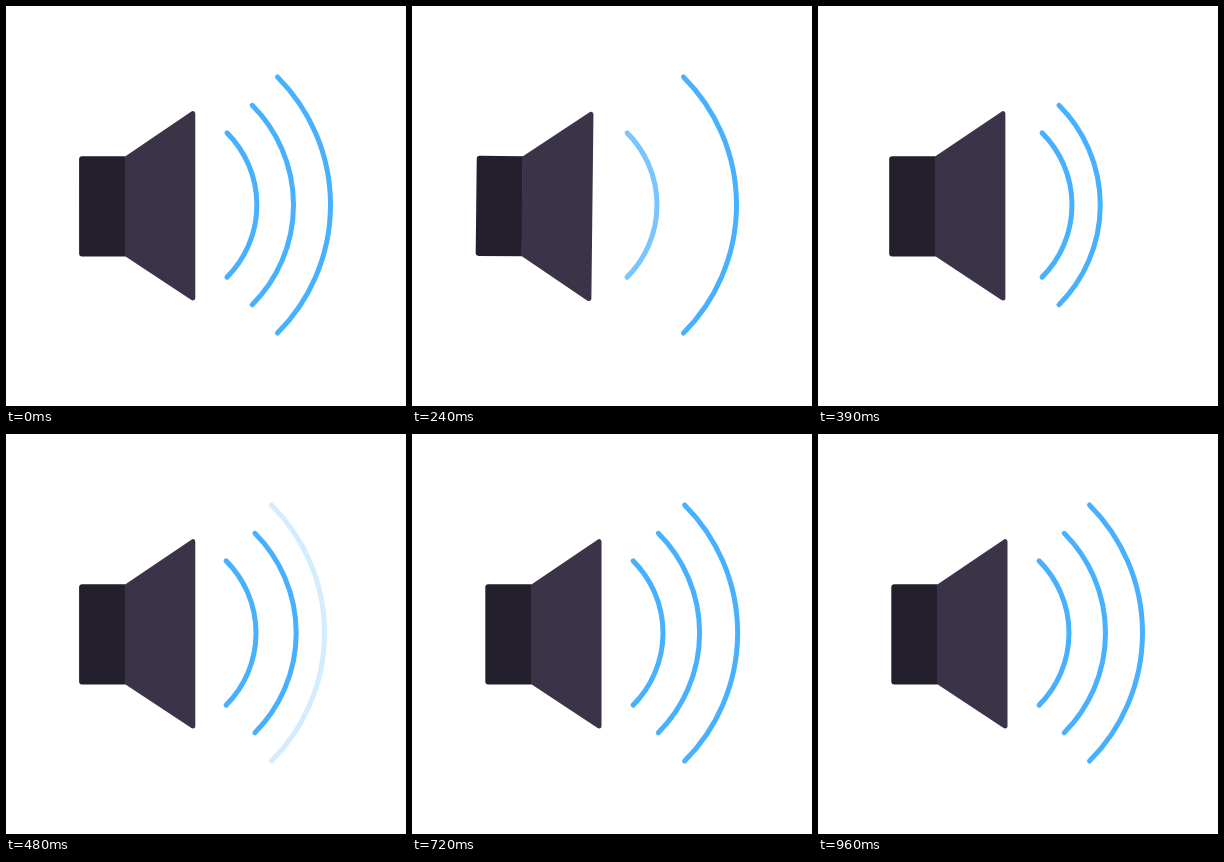
An HTML page with a canvas for the animation above (1.99 s loop, 400 by 400 pixels).

```html
<!DOCTYPE html>
<html lang="en">
<head>
<meta charset="utf-8">
<title>Speaker</title>
<style>
html, body { margin: 0; width: 100%; height: 100%; overflow: hidden; background: #fff; }
canvas { display: block; width: 400px; height: 400px; }
</style>
</head>
<body>
<canvas id="stage" width="400" height="400"></canvas>
<script>
const ctx = document.getElementById('stage').getContext('2d');
const LOOP = 1990, END = 960;

// back: pull-back begins, out: faded out, spring: release
const waves = [
  { apex: 251, r: 102, back: 0, out: 150, spring: 255 },
  { apex: 287.5, r: 141, back: 92, out: 241, spring: 376 },
  { apex: 324.5, r: 181, back: 242, out: 391, spring: 540 }
];

const ramp = (t, a, b) => Math.min(1, Math.max(0, (t - a) / (b - a)));
const sineOut = p => Math.sin(p * Math.PI / 2);

function waveShift(w, t) {
  if (t < w.spring) return -6 * sineOut(ramp(t, w.back, w.back + 85));
  const p = (t - w.spring) / 135;
  const settle = 1 - ramp(t, w.spring + 300, w.spring + 420);
  return -6 * Math.cos(p * Math.PI) * Math.pow(0.5, p) * settle;
}

function waveAlpha(w, t) {
  const fadeOut = 1 - ramp(t, w.out - 60, w.out);
  const fadeIn = ramp(t, w.spring - 80, w.spring + 10);
  return Math.max(fadeOut, fadeIn);
}

function drawWave(w, t) {
  ctx.globalAlpha = waveAlpha(w, t);
  ctx.strokeStyle = '#47b1ff';
  ctx.lineWidth = 5;
  ctx.lineCap = 'round';
  ctx.beginPath();
  ctx.arc(w.apex - w.r + waveShift(w, t), 199, w.r, -Math.PI / 4, Math.PI / 4);
  ctx.stroke();
  ctx.globalAlpha = 1;
}

function drawSpeaker(t) {
  const recoil = -16 * (t < 130 ? sineOut(t / 130) : 1 - sineOut(ramp(t, 130, 520)));
  const tilt = t < 330 ? -0.65 * Math.sin(t / 165 * Math.PI) : 0;
  ctx.save();
  ctx.translate(131 + recoil, 200);
  ctx.rotate(tilt * Math.PI / 180);
  ctx.translate(-131, -200);

  ctx.fillStyle = '#231f2d';
  ctx.beginPath();
  ctx.roundRect(73.3, 150.3, 46.2, 100.2, [3, 0, 0, 3]);
  ctx.fill();

  ctx.beginPath();
  ctx.rect(119, 90, 90, 220);
  ctx.clip();
  ctx.fillStyle = ctx.strokeStyle = '#3b3347';
  ctx.lineWidth = 5;
  ctx.lineJoin = 'round';
  ctx.beginPath();
  ctx.moveTo(110, 160);
  ctx.lineTo(119, 153.7);
  ctx.lineTo(187, 107.7);
  ctx.lineTo(187, 292);
  ctx.lineTo(119, 247);
  ctx.lineTo(110, 241);
  ctx.closePath();
  ctx.fill();
  ctx.stroke();
  ctx.restore();
}

function render(t) {
  ctx.fillStyle = '#fff';
  ctx.fillRect(0, 0, 400, 400);
  drawSpeaker(t);
  for (const w of waves) drawWave(w, t);
}

const start = performance.now();
function tick() {
  const t = (performance.now() - start) % LOOP;
  render(Math.min(t, END));
  requestAnimationFrame(tick);
}
tick();
</script>
</body>
</html>
```
